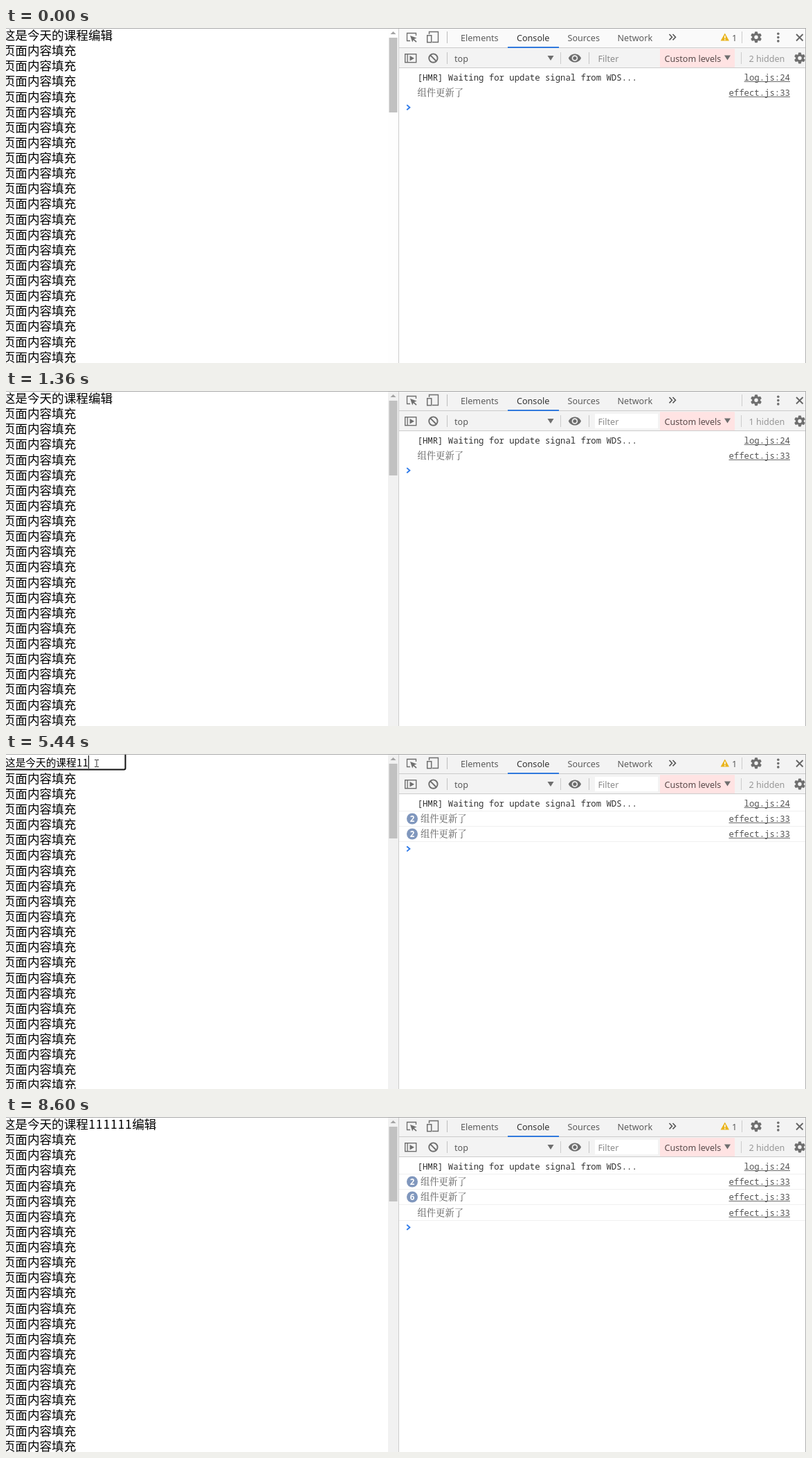
Write an HTML page with a canvas that moves like this. It is 1156 px wide and 484 px high and loops after 9 s.

```html
<!DOCTYPE html>
<html lang="zh-CN">
<head>
<meta charset="utf-8">
<title>Console</title>
<style>
html, body { margin: 0; width: 100%; height: 100%; overflow: hidden; background: #fff; }
canvas { display: block; width: 1156px; height: 484px; }
</style>
</head>
<body>
<canvas id="stage"></canvas>
<script>
const W = 1156, H = 484, LOOP = 9000;
const canvas = document.getElementById('stage');
const ctx = canvas.getContext('2d', { alpha: false });
const dpr = window.devicePixelRatio || 1;
canvas.width = W * dpr;
canvas.height = H * dpr;

const CJK = '"Noto Sans CJK SC", "Noto Sans CJK", sans-serif';
const UI = '12.6px "Noto Sans", "Open Sans", sans-serif';
const MONO = '12.3px "Noto Sans Mono", "DejaVu Sans Mono", monospace';
const LOG_CJK = '13.3px "Noto Serif CJK SC", "Noto Sans CJK SC", serif';
const ICON = '#6e6e6e';

// Moments at which a digit is typed
const KEYS = [4880, 5440, 5810, 5970, 6270, 6420];

// [time, kind, x, y]; each pose holds until the next
const POINTER = [
  [0, ''], [1630, 'arrow', 233, 1], [1750, 'arrow', 251, 70], [1900, 'arrow', 232, 74],
  [2020, 'arrow', 210, 65], [2170, 'arrow', 185, 63], [2320, 'arrow', 163, 45],
  [2440, 'arrow', 137, 20], [2590, 'beam', 131, 13], [2710, ''], [3020, 'beam', 131, 13],
  [6950, 'arrow', 158, 48], [7070, 'arrow', 187, 89], [8060, 'arrow', 365, 133],
  [8180, 'arrow', 1059, 391], [8330, 'arrow', 1103, 392], [8480, 'arrow', 1118, 463], [8600, '']
];

function rect(x, y, w, h, color) {
  ctx.fillStyle = color;
  ctx.fillRect(x, y, w, h);
}

function text(str, x, y, font, color, align = 'left') {
  ctx.font = font;
  ctx.fillStyle = color;
  ctx.textAlign = align;
  ctx.fillText(str, x, y);
}

function disc(x, y, r, color) {
  ctx.fillStyle = color;
  ctx.beginPath();
  ctx.arc(x, y, r, 0, Math.PI * 2);
  ctx.fill();
}

function shape(points, color) {
  ctx.fillStyle = color;
  ctx.beginPath();
  points.forEach(([x, y]) => ctx.lineTo(x, y));
  ctx.closePath();
  ctx.fill();
}

function line(points, color, width) {
  ctx.strokeStyle = color;
  ctx.lineWidth = width;
  ctx.beginPath();
  points.forEach(([x, y], i) => i ? ctx.lineTo(x, y) : ctx.moveTo(x, y));
  ctx.stroke();
}

function frame(x, y, w, h, color, width) {
  ctx.strokeStyle = color;
  ctx.lineWidth = width;
  ctx.strokeRect(x, y, w, h);
}

function gear(x, y, hole) {
  ctx.save();
  ctx.translate(x, y);
  disc(0, 0, 5.8, ICON);
  for (let i = 0; i < 6; i++) {
    ctx.rotate(Math.PI / 3);
    shape([[-2.6, -5], [-1.7, -8], [1.7, -8], [2.6, -5]], ICON);
  }
  disc(0, 0, 2.7, hole);
  ctx.restore();
}

function dropArrow(x, y) {
  shape([[x, y], [x + 9, y], [x + 4.5, y + 7]], ICON);
}

function tabBar(warning, back) {
  rect(568, 1, 587, 27, back);
  rect(568, 28, 587, 1, '#cccccc');

  line([[584, 18.5], [579.5, 18.5], [579.5, 7.5], [592.5, 7.5], [592.5, 11]], ICON, 1.3);
  shape([[584, 11], [593.5, 14.6], [589.7, 16], [593.6, 19.6], [592.4, 20.8], [588.7, 17.2], [587.2, 20.6]], ICON);

  line([[611.5, 9], [611.5, 5.5], [624.5, 5.5], [624.5, 20.5], [616, 20.5]], ICON, 1.4);
  frame(608.7, 10.7, 6, 10, ICON, 1.5);

  rect(637, 5, 1, 17, '#bdbdbd');
  text('Elements', 657, 18.5, UI, '#5a5a5a');
  text('Console', 738, 18.5, UI, '#333333');
  text('Sources', 811.5, 18.5, UI, '#5a5a5a');
  text('Network', 883.5, 18.5, UI, '#5a5a5a');
  rect(725, 27, 74, 2, '#3079dd');
  for (const x of [958.5, 963.5]) line([[x, 9], [x + 4, 13.2], [x, 17.4]], '#555555', 1.6);

  if (warning) {
    shape([[1038.8, 7.5], [1045, 18.5], [1032.6, 18.5]], '#e9b41c');
    rect(1038.1, 11, 1.5, 4, '#fff');
    rect(1038.1, 16, 1.5, 1.5, '#fff');
    text('1', 1049, 18.5, UI, '#5a5a5a');
  }
  rect(1063, 5, 1, 17, '#cccccc');
  gear(1084, 13.2, back);
  for (const y of [8.3, 13.6, 18.9]) disc(1115.8, y, 1.8, ICON);
  line([[1142, 9], [1151.5, 18.5]], '#666666', 1.9);
  line([[1151.5, 9], [1142, 18.5]], '#666666', 1.9);
}

function filterBar(hidden, whiteField) {
  rect(568, 29, 587, 28, '#f3f3f3');
  rect(568, 57, 587, 1, '#cccccc');

  frame(576.7, 37.7, 16, 12, ICON, 1.4);
  rect(579.5, 38, 1.3, 12, ICON);
  shape([[583.5, 40], [583.5, 47.6], [590, 43.8]], ICON);

  ctx.strokeStyle = ICON;
  ctx.lineWidth = 1.9;
  ctx.beginPath();
  ctx.arc(617.4, 43.6, 6.2, 0, Math.PI * 2);
  ctx.stroke();
  line([[613, 39.2], [621.8, 48]], ICON, 1.9);

  rect(637, 35, 1, 17, '#c4c4c4');
  text('top', 648, 48.5, UI, '#5a5a5a');
  dropArrow(782.5, 40);
  rect(801, 35, 1, 17, '#cccccc');

  ctx.fillStyle = ICON;
  ctx.beginPath();
  ctx.moveTo(812.8, 43.5);
  ctx.bezierCurveTo(816.5, 35.5, 827.5, 35.5, 831, 43.5);
  ctx.bezierCurveTo(827.5, 51.5, 816.5, 51.5, 812.8, 43.5);
  ctx.fill();
  disc(821.9, 43.5, 4.3, '#f3f3f3');
  disc(821.9, 43.5, 2.6, ICON);

  rect(842, 35, 1, 17, '#c4c4c4');
  if (whiteField) rect(851, 33, 91, 21, '#fff');
  text('Filter', 855.5, 48.5, UI, '#8a8a8a');
  rect(945, 30, 108, 27, '#ffe3e3');
  text('Custom levels', 951.5, 48.5, UI, '#5a4a4a');
  dropArrow(1038, 39.5);
  rect(1062, 35, 1, 17, '#cccccc');
  text(hidden + ' hidden', 1073.5, 48.5, UI, '#979797');
  gear(1147, 43.5, '#f3f3f3');
}

function logRow(i, row, ruled) {
  const y = Math.round(71.5 + 22.4 * i);
  if (row.msg) {
    text(row.msg, 594.5, y + 4, MONO, '#303030');
  } else {
    if (row.count > 1) {
      disc(587, y - 0.5, 8, '#8097bd');
      text(row.count, 587, y + 3.7, 'bold 11.5px "Noto Sans", sans-serif', '#fff', 'center');
    }
    text('组件更新了', row.count > 1 ? 599 : 594.5, y + 4, LOG_CJK, '#5c5c5c');
  }
  const link = row.msg ? 'log.js:24' : 'effect.js:33';
  text(link, 1133, y + 4, MONO, '#545454', 'right');
  const w = ctx.measureText(link).width;
  rect(1133 - w, y + 5, w, 1, '#6a6a6a');
  if (ruled) rect(568, y + 10, 587, 1, '#f0f0f0');
}

function logsAt(t, typed) {
  if (t >= 770 && t < 1210) return [];
  const rows = [{ msg: '[HMR] Waiting for update signal from WDS...' }, { count: t >= 3020 ? 2 : 1 }];
  if (typed) rows.push({ count: typed });
  if (t >= 7220) rows.push({ count: 1 });
  return rows;
}

function devtools(t, typed) {
  const busy = t >= 770;
  tabBar(!busy || t >= 1630, t < 1020 ? '#fafafa' : '#f3f3f3');
  filterBar(busy && t < 1480 ? 1 : 2, t >= 1020);
  const rows = logsAt(t, typed);
  rows.forEach((row, i) => logRow(i, row, t >= 4880));
  const y = 70 + 22.35 * rows.length;
  line([[579.2, y - 3.6], [583.4, y], [579.2, y + 3.6]], '#2f7bea', 1.9);
}

// CJK title with evenly pitched digits in the middle
function title(x, y, size, digits, tail) {
  const font = size + 'px ' + CJK;
  text('这是今天的课程', x, y, font, '#000');
  let end = x + 7 * size;
  for (let i = 0; i < digits; i++, end += size * 0.6) {
    text('1', end + size * 0.3, y, font, '#000', 'center');
  }
  text(tail, end, y, font, '#000');
}

function field(focused) {
  ctx.strokeStyle = focused ? '#101010' : '#767676';
  ctx.lineWidth = focused ? 2 : 1;
  const edge = focused ? 0 : 1;
  ctx.beginPath();
  ctx.roundRect(-20, -10, 192.5 - edge, 32.5 - edge, 2);
  ctx.stroke();
}

function page(t, typed) {
  if (t >= 1020 && t < 1210) return;
  const editing = t >= 3020 && t < 7220;
  ctx.save();
  ctx.beginPath();
  ctx.rect(0, 0, 552, H);
  ctx.clip();
  if (editing) {
    field(t >= 3860);
    title(-1, 17.5, 14.667, typed, '');
    const caret = t >= 3860 && t < 6950 && !(t >= 4450 && t < 4880);
    if (caret) rect(Math.floor(101.5 + 8.8 * typed), 2, 1, 19, '#000');
  } else {
    title(-4.3, 17, 17.6, typed, '编辑');
  }
  for (let i = 1; i < 22; i++) {
    text('页面内容填充', -4.3, Math.round(17 + 22.13 * i + (editing ? 2.7 : 0)), '17.6px ' + CJK, '#000');
  }
  ctx.restore();

  rect(552, 1, 15, H, t < 1020 ? '#fefefe' : '#f1f1f1');
  shape([[559.5, 5], [563.5, 9], [555.5, 9]], '#a3a3a3');
  rect(553.5, 14, 12, 108, '#c1c1c1');
}

function pointer(t) {
  const [, kind, x, y] = POINTER.filter(p => p[0] <= t).pop();
  if (kind === 'beam') {
    rect(x - 0.5, y - 5, 1, 11, '#333');
    for (const dy of [-5, 5]) {
      rect(x - 3, y + dy, 2.5, 1, '#333');
      rect(x + 0.5, y + dy, 2.5, 1, '#333');
    }
  } else if (kind === 'arrow') {
    const tip = [[0.5, 0.5], [0.5, 11.5], [3, 9.2], [4.8, 13.2], [6.6, 12.4], [4.9, 8.5], [8.4, 8.3]]
      .map(([dx, dy]) => [x + dx, y + dy]);
    shape(tip, '#fff');
    ctx.lineJoin = 'round';
    line([...tip, tip[0]], '#222', 1);
    ctx.lineJoin = 'miter';
  }
}

function draw(t) {
  const typed = KEYS.filter(k => k <= t).length;
  ctx.setTransform(dpr, 0, 0, dpr, 0, 0);
  rect(0, 0, W, H, '#fff');
  page(t, typed);
  devtools(t, typed);
  rect(567, 0, 1, H, '#cccccc');
  rect(1155, 0, 1, H, '#b0b0b0');
  rect(0, 0, W, 1, '#a9a9a9');
  pointer(t);
}

const start = performance.now();
function tick() {
  draw((performance.now() - start) % LOOP);
  requestAnimationFrame(tick);
}
tick();
</script>
</body>
</html>
```
